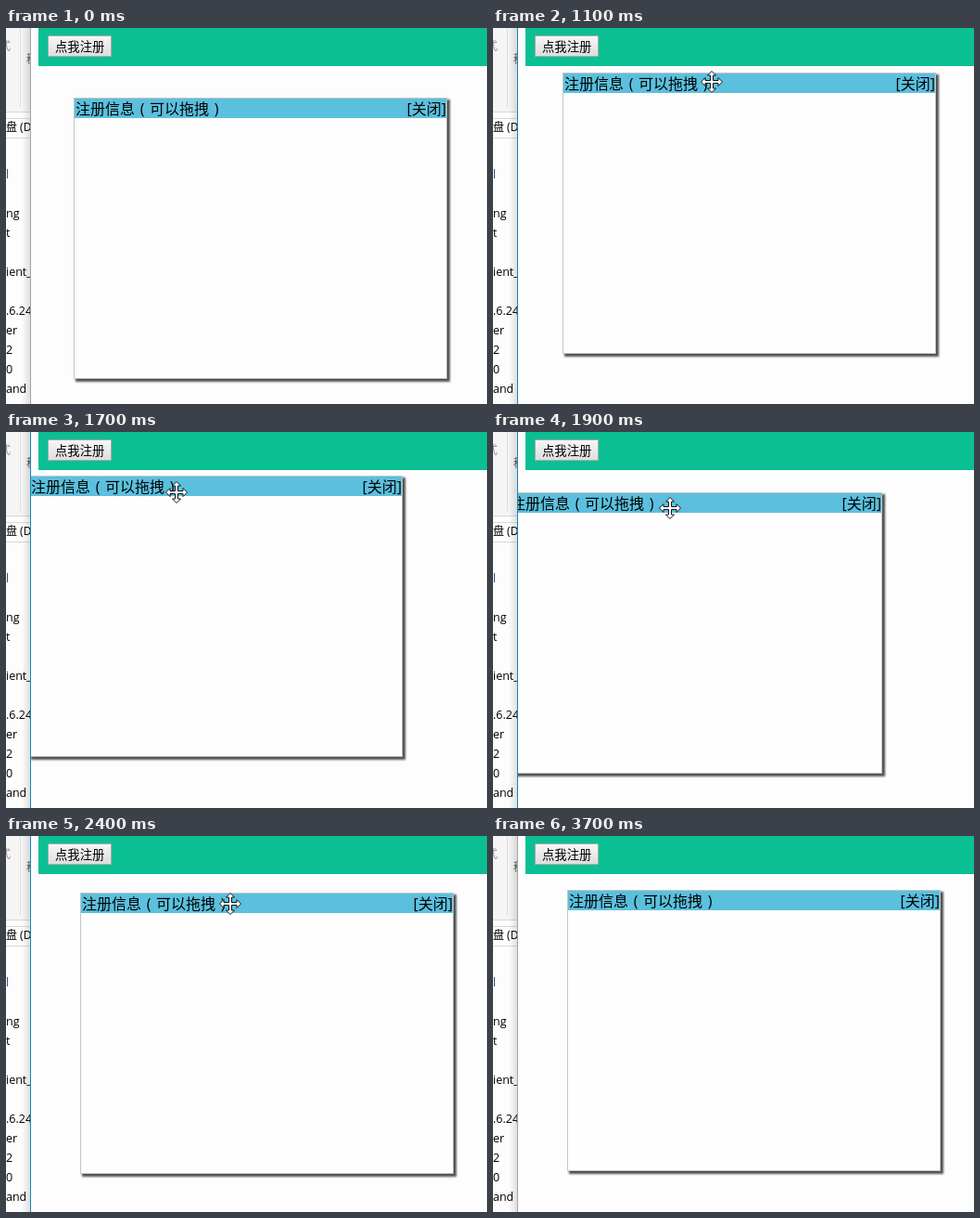
Animation, 519 px wide and 405 px high, one loop 3.8 s. Source, as an HTML page:

```html
<!DOCTYPE html>
<html lang="zh-CN">
<head>
<meta charset="utf-8">
<style>
html, body { margin: 0; width: 100%; height: 100%; overflow: hidden; background: #fdfdfd; }
svg { display: block; }
text { font-family: "Open Sans", "Noto Sans CJK SC", "Noto Sans CJK", sans-serif; white-space: pre; }
</style>
</head>
<body>
<svg width="519" height="405" viewBox="0 0 519 405">
  <defs>
    <linearGradient id="buttonFill" x2="0" y2="1">
      <stop stop-color="#f7f7f7"/><stop offset="1" stop-color="#dddddd"/>
    </linearGradient>
    <linearGradient id="edgeShade">
      <stop stop-color="#000" stop-opacity="0"/><stop offset="1" stop-color="#000" stop-opacity=".13"/>
    </linearGradient>
    <filter id="blur" x="-5%" y="-5%" width="110%" height="110%"><feGaussianBlur stdDeviation="1"/></filter>
    <clipPath id="sideClip"><rect width="27" height="405"/></clipPath>
    <clipPath id="pageClip"><rect x="27" width="492" height="405"/></clipPath>
  </defs>

  <rect width="519" height="405" fill="#fdfdfd"/>
  <g clip-path="url(#sideClip)">
    <rect width="27" height="90" fill="#f5f5f6"/>
    <path d="M15.5 0V85" stroke="#dedede"/>
    <path d="M0 90.5H27M0 97.5H27M0 118.5H27" stroke="#d9d9d9"/>
    <text x="-7" y="24" font-size="12" fill="#9a8fa5">式</text>
    <text x="22" y="38" font-size="12" fill="#555">移</text>
    <text y="111" font-size="12">盘 (D</text>
    <g id="files" font-size="12.5"></g>
    <rect x="17" width="10" height="405" fill="url(#edgeShade)"/>
  </g>
  <path id="edge" d="M26.5 0V405"/>

  <rect x="35" width="484" height="41" fill="#0abf92"/>
  <rect x="45.5" y="8.5" width="68" height="22" fill="url(#buttonFill)" stroke="#a9a9a9"/>
  <text x="53" y="25" font-size="13.33">点我注册</text>

  <g clip-path="url(#pageClip)">
    <g id="dialog">
      <rect x="1" y="1" width="404" height="304" fill="#505050" filter="url(#blur)"/>
      <rect x="-.5" y="-.5" width="402" height="302" fill="#fefefe" stroke="#c4c4c4"/>
      <rect width="401" height="21" fill="#5bc0de"/>
      <g font-size="16">
        <text x="1" y="17">注册信息</text>
        <text x="81" y="17">可以拖拽</text>
        <g text-anchor="middle"><text x="73" y="17">(</text><text x="153" y="17">)</text></g>
        <text x="401" y="17" text-anchor="end">[关闭]</text>
      </g>
    </g>
  </g>

  <g id="pointer" fill="#fff" stroke="#111" stroke-linejoin="round">
    <path id="moveShape" d="M0-11.5L4.5-7H1.5V-1.5H7V-4.5L11.5 0L7 4.5V1.5H1.5V7H4.5L0 11.5L-4.5 7H-1.5V1.5H-7V4.5L-11.5 0L-7-4.5V-1.5H-1.5V-7H-4.5Z"/>
    <path id="arrowShape" d="M.5.5V16.5L4.5 13L7 19L9.5 18L7 12H12Z"/>
  </g>
</svg>
<script>
const LOOP = 3800, STEP = 100;
const DRAG_START = 900, LEAVE = 3000;
const GRAB = { x: 161, y: 12 }, LEAD = 50;
const byId = id => document.getElementById(id);

const linear = p => p;
const smooth = p => (1 - Math.cos(Math.PI * p)) / 2;
const sineOut = p => Math.sin(Math.PI * p / 2);
const quadOut = p => 1 - (1 - p) ** 2;

// Distance covered by time t of a move lasting from start to end.
function glide(t, start, end, distance, ease) {
  const p = Math.min(1, Math.max(0, (t - start) / (end - start)));
  return distance * ease(p);
}

function dialogAt(t) {
  return {
    x: 74 + glide(t, DRAG_START, 1000, 2, linear)
      + glide(t, 1080, 1900, -58, smooth)
      + glide(t, 1900, 2400, 63, quadOut),
    y: (t < 100 ? 76 : 66) + glide(t, DRAG_START, 1440, -28, quadOut)
      + glide(t, 1500, 2060, 35, smooth)
      + glide(t, 2100, 2600, -14, sineOut)
  };
}

// While dragging, the dialog trails slightly behind the pointer.
function pointerAt(t) {
  if (t < DRAG_START) return {
    x: 328 + glide(t, 400, DRAG_START, -93, sineOut),
    y: 63 + glide(t, 400, DRAG_START, 15, sineOut)
  };
  const held = dialogAt(t + LEAD);
  return {
    x: held.x + GRAB.x + glide(t, LEAVE, 3300, 242, linear),
    y: held.y + GRAB.y + glide(t, LEAVE, 3300, 63, linear)
  };
}

const files = ["l", "", "ng", "t", "", "ient_", "", ".6.24", "er", "2", "0", "and F"];
byId("files").innerHTML = files.map((label, row) =>
  `<text y="${162 + row * 21}" fill="${row ? "#000" : "#1d4c7c"}">${label}</text>`).join("");

const place = (id, { x, y }) =>
  byId(id).setAttribute("transform", `translate(${Math.round(x)} ${Math.round(y)})`);
const show = (id, visible) => byId(id).setAttribute("display", visible ? "inline" : "none");

function render(time) {
  const t = Math.floor((time % LOOP) / STEP) * STEP;
  const overTitle = t >= 600 && t <= LEAVE;
  place("dialog", dialogAt(t));
  place("pointer", pointerAt(t));
  show("pointer", t >= 400 && t < 3400);
  show("moveShape", overTitle);
  show("arrowShape", !overTitle);
  byId("edge").setAttribute("stroke", t >= 800 && t < 3700 ? "#1883b7" : "#a5a5a5");
}

const start = performance.now();
function tick() {
  render(performance.now() - start);
  requestAnimationFrame(tick);
}
tick();
</script>
</body>
</html>
```
